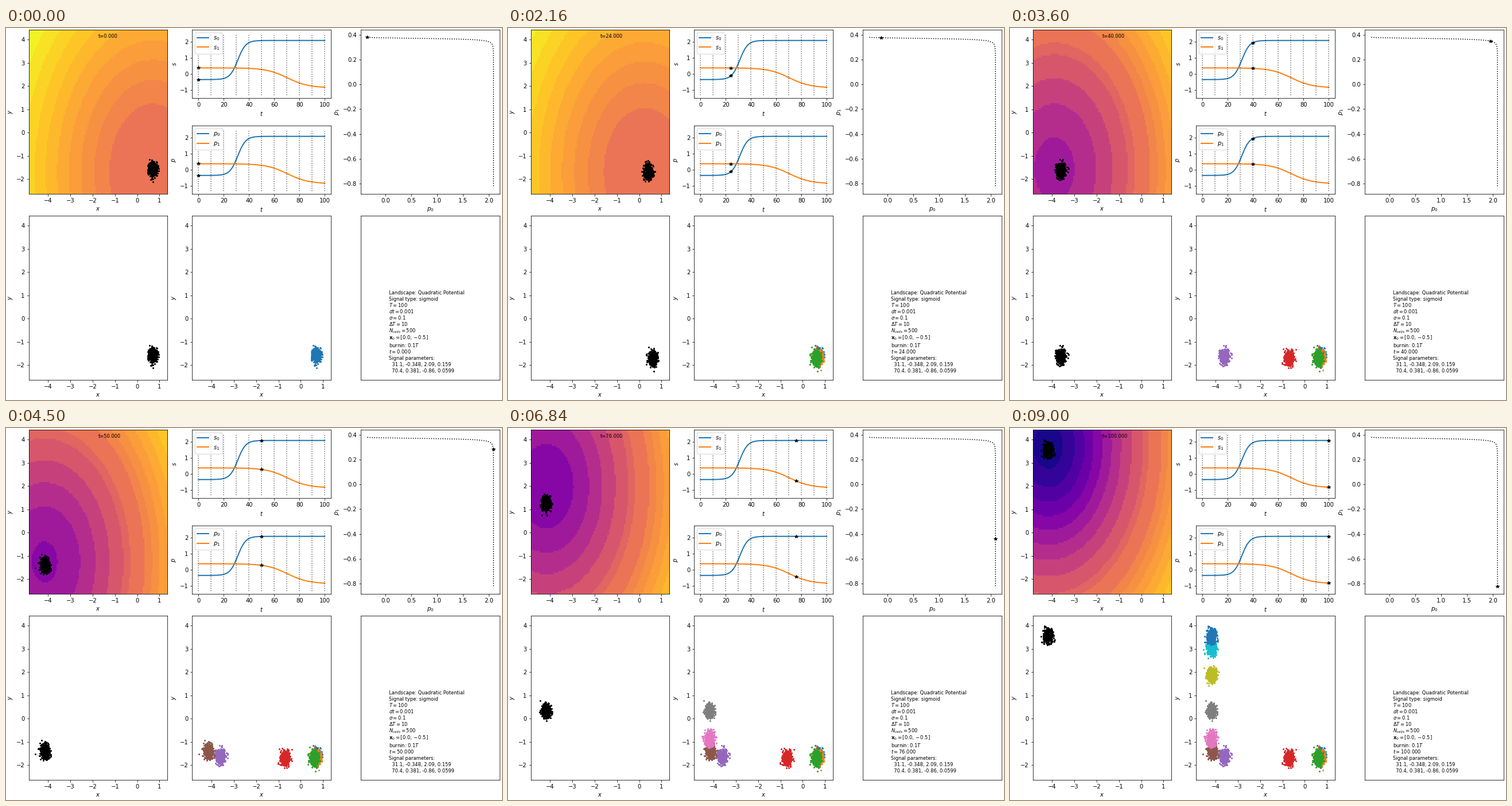
Animation of 864 by 648 pixels, one loop 9090 ms. Source, as a matplotlib script:

```python
import numpy as np
import matplotlib.pyplot as plt
from matplotlib.animation import FuncAnimation
from matplotlib.colors import BoundaryNorm, ListedColormap

W, H, DPI = 864, 648, 72
COLS, ROWS = (39.6, 324.4, 618.4), (3, 327)
PANEL_W, PANEL_H = 241.8, 286.3
SIGNAL_H = PANEL_H / 2.4

T_END, STEP, N_CELLS, SIGMA = 100, 10, 500, 0.1
SIGNAL = [(31.1, -0.348, 2.09, 0.159), (70.4, 0.381, -0.86, 0.0599)]
CURV = np.array([1 / 2, 2 / 9])
XLIM, YLIM = (-4.87, 1.36), (-2.645, 4.43)


def signal(t):
    return np.array([a + (b - a) * (1 + np.tanh(r * (t - tc))) / 2
                     for tc, a, b, r in SIGNAL])


def simulate(dt=0.05):
    """Cell positions at t = 0, 1, ..., T_END, after a burn-in."""
    rng = np.random.default_rng(7)
    cells = np.tile([0.0, -0.5], (N_CELLS, 1))
    per_unit = round(1 / dt)
    states = []
    for i in range(-10 * per_unit, T_END * per_unit + 1):
        if i >= 0 and i % per_unit == 0:
            states.append(cells.copy())
        drift = -(CURV * cells + signal(max(i * dt, 0)))
        cells = cells + drift * dt + SIGMA * np.sqrt(dt) * rng.standard_normal(cells.shape)
    return states


def centers(lo, hi, n=100):
    return lo + (np.arange(n) + 0.5) * (hi - lo) / n


GX, GY = np.meshgrid(centers(*XLIM), centers(*YLIM))
V_MIN = -np.sum(signal(T_END) ** 2 / (2 * CURV))


def log_height(t):
    p0, p1 = signal(t)
    v = CURV[0] / 2 * GX**2 + CURV[1] / 2 * GY**2 + p0 * GX + p1 * GY
    return np.log(np.maximum(1 + v - V_MIN, 1))


states = simulate()
times = np.linspace(0, T_END, 1001)
curve = signal(times)

fig = plt.figure(figsize=(W / DPI, H / DPI), dpi=DPI)


def panel(x, top, height=PANEL_H, xlabel="", ylabel=""):
    ax = fig.add_axes([x / W, 1 - (top + height) / H, PANEL_W / W, height / H])
    ax.set_xlabel(xlabel)
    ax.set_ylabel(ylabel)
    return ax


def plane(x, top):
    ax = panel(x, top, xlabel="$x$", ylabel="$y$")
    ax.set(xlim=XLIM, ylim=YLIM, xticks=range(-4, 2), yticks=range(-2, 5))
    return ax


def dots(ax, color):
    return ax.plot([], [], "o", ms=2, mew=1, color=color)[0]


def star(ax):
    return ax.plot([], [], "k*", ms=6, zorder=5)[0]


def signal_panel(top, name):
    ax = panel(COLS[1], top, SIGNAL_H, "$t$", f"${name}$")
    for i in range(2):
        ax.plot(times, curve[i], lw=2, label=f"${name}_{i}$")
    ax.vlines(range(0, T_END + 1, STEP), curve.min() - 0.5, curve.max() + 0.4,
              colors="k", linestyles=":", alpha=0.6)
    ax.set(xlim=(-5, 105), ylim=(-1.51, 2.76),
           xticks=range(0, 101, 20), yticks=[-1, 0, 1, 2])
    ax.legend(loc="upper left")
    return [star(ax), star(ax)]


# Landscape, with finer colour bands in the upper range
land = plane(COLS[0], ROWS[0])
levels = np.array([0, *range(1, 18, 2), 18, *range(20, 30)]) / 29
colors = plt.get_cmap("plasma")((levels[:-1] + levels[1:]) / 2)
heat = land.imshow(log_height(0), extent=(*XLIM, *YLIM), origin="lower", aspect="auto",
                   interpolation="nearest", cmap=ListedColormap(colors),
                   norm=BoundaryNorm(levels * log_height(0).max(), len(colors)))
cells_now = dots(land, "k")
clock = land.text(0.5, 0.95, "", transform=land.transAxes, fontsize="small")

# Signals and parameters over time
stars = (signal_panel(ROWS[0], "s")
         + signal_panel(ROWS[0] + PANEL_H - SIGNAL_H, "p"))

# Parameter path
path = panel(COLS[2], ROWS[0], xlabel="$p_0$", ylabel="$p_1$")
path.plot(*curve, "k:")
path_star = star(path)

# Latest snapshot and all snapshots
latest = dots(plane(COLS[0], ROWS[1]), "k")
history_ax = plane(COLS[1], ROWS[1])
history = [dots(history_ax, f"C{i % 10}") for i in range(T_END // STEP + 1)]

# Summary
notes = panel(COLS[2], ROWS[1])
notes.set(xticks=[], yticks=[])
CLOCK_LINE = "$t={:.3f}$"
lines = [
    "Landscape: Quadratic Potential",
    "Signal type: sigmoid",
    f"$T={T_END}$",
    "$dt=0.001$",
    rf"$\sigma={SIGMA}$",
    rf"$\Delta T={STEP}$",
    f"$N_{{cells}}={N_CELLS}$",
    r"$\mathbf{x}_0=[0.0, -0.5]$",
    "burnin: $0.1T$",
    CLOCK_LINE,
    "Signal parameters:",
]
lines += ["  " + ", ".join(f"{v:.3g}" for v in row) for row in SIGNAL]

# Lines with brackets take more height
heights = [15 if "[" in line else 11 for line in lines]
baseline = 464
summary = []
for i, line in enumerate(lines):
    if i:
        baseline += (heights[i - 1] + heights[i]) / 2
    summary.append(fig.text(667 / W, 1 - baseline / H, line, fontsize="small"))
summary_clock = summary[lines.index(CLOCK_LINE)]


def update(t):
    p = signal(t)
    heat.set_data(log_height(t))
    cells_now.set_data(*states[t].T)
    clock.set_text(f"t={t:.3f}")
    summary_clock.set_text(CLOCK_LINE.format(t))
    for i, mark in enumerate(stars):
        mark.set_data([t], [p[i % 2]])
    path_star.set_data([p[0]], [p[1]])
    last = t // STEP
    latest.set_data(*states[last * STEP].T)
    for i, group in enumerate(history):
        if i <= last:
            group.set_data(*states[i * STEP].T)
        else:
            group.set_data([], [])
    return []


anim = FuncAnimation(fig, update, frames=T_END + 1, interval=90,
                     init_func=lambda: update(0), repeat=True, repeat_delay=0)
plt.show()
```
